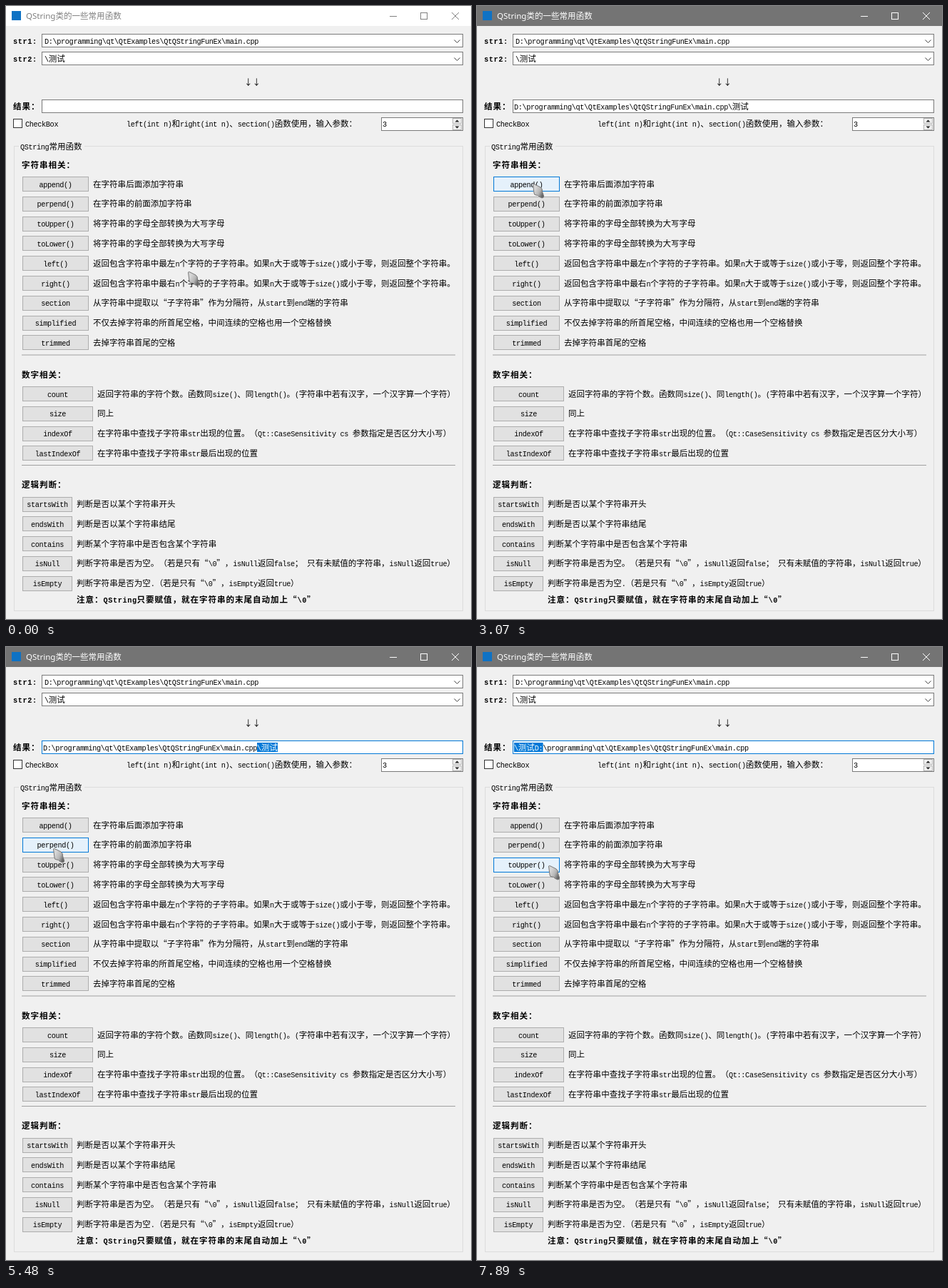
An HTML page with a canvas for the animation above (8 s loop, 652 by 859 pixels).

```html
<!DOCTYPE html>
<html lang="zh-CN">
<head>
<meta charset="utf-8">
<style>
html, body { margin: 0; height: 100%; overflow: hidden; background: #f0f0f0; }
canvas { display: block; }
</style>
</head>
<body>
<canvas id="stage" width="652" height="859"></canvas>
<script>
const ctx = document.getElementById('stage').getContext('2d');
const LOOP = 8000, CELL = 5.77;
const GREY = '#7a7a7a', DARK = '#171717', BLUE = '#0078d7';
const PATH = 'D:\\programming\\qt\\QtExamples\\QtQStringFunEx\\main.cpp';
const TAIL = '\\测试';

// Button groups: first row centre, button width, rows of [name, description]
const groups = [
  { title: '字符串相关：', titleY: 223, top: 249.5, width: 93, rows: [
    ['append()', '在字符串后面添加字符串'],
    ['perpend()', '在字符串的前面添加字符串'],
    ['toUpper()', '将字符串的字母全部转换为大写字母'],
    ['toLower()', '将字符串的字母全部转换为大写字母'],
    ['left()', '返回包含字符串中最左n个字符的子字符串。如果n大于或等于size()或小于零，则返回整个字符串。'],
    ['right()', '返回包含字符串中最右n个字符的子字符串。如果n大于或等于size()或小于零，则返回整个字符串。'],
    ['section', '从字符串中提取以“子字符串”作为分隔符，从start到end端的字符串'],
    ['simplified', '不仅去掉字符串的所首尾空格，中间连续的空格也用一个空格替换'],
    ['trimmed', '去掉字符串首尾的空格']] },
  { title: '数字相关：', titleY: 517, top: 543.5, width: 99, rows: [
    ['count', '返回字符串的字符个数。函数同size()、同length()。(字符串中若有汉字，一个汉字算一个字符）'],
    ['size', '同上'],
    ['indexOf', '在字符串中查找子字符串str出现的位置。（Qt::CaseSensitivity cs 参数指定是否区分大小写）'],
    ['lastIndexOf', '在字符串中查找子字符串str最后出现的位置']] },
  { title: '逻辑判断：', titleY: 671, top: 698, width: 70, rows: [
    ['startsWith', '判断是否以某个字符串开头'],
    ['endsWith', '判断是否以某个字符串结尾'],
    ['contains', '判断某个字符串中是否包含某个字符串'],
    ['isNull', '判断字符串是否为空。（若是只有“\\0”，isNull返回false； 只有未赋值的字符串，isNull返回true）'],
    ['isEmpty', '判断字符串是否为空.（若是只有“\\0”，isEmpty返回true）']] },
];

// Each step changes part of the state; sel is a [from, to] range of the result text in x
const steps = [
  [0, { at: [255, 372], beam: false, active: false, result: '', sel: null, edge: GREY, edge2: GREY, hot: {} }],
  [330, { at: [105, 165] }],
  [680, { at: [108, 105], edge: DARK }],
  [1020, { at: [112, 80], edge: GREY, edge2: DARK }],
  [1360, { at: [122, 75.5], beam: true }],
  [2390, { at: [75, 213], beam: false, edge2: GREY }],
  [2720, { at: [75, 238], hot: { 'append()': 1 } }],
  [3070, { at: [78, 249], active: true, result: PATH + TAIL }],
  [3420, { at: [78, 246] }],
  [3760, { at: [185, 162], hot: { 'append()': 0.15 } }],
  [4110, { at: [401, 143], beam: true, edge: DARK, hot: {} }],
  [4440, { at: [372, 145], sel: [369, 381] }],
  [4790, { at: [356, 138], sel: [352, 381] }],
  [5140, { at: [66, 289], beam: false, edge: '#0c4b7c' }],
  [5480, { at: [66, 282], edge: BLUE, hot: { 'perpend()': 1 } }],
  [5820, { result: TAIL + PATH, sel: null, edge: GREY }],
  [6150, { at: [58, 234], hot: { 'append()': 0.3, 'perpend()': 1 } }],
  [6500, { at: [97, 147], beam: true, edge: DARK, hot: {} }],
  [6850, { at: [64, 139], sel: [69.3, 92.6] }],
  [7190, { at: [53, 145], sel: [52, 92.6] }],
  [7540, { at: [100, 306], beam: false, edge: BLUE, hot: { 'toUpper()': 0.5 } }],
  [7890, { hot: { 'toUpper()': 1 } }],
];

const stateAt = t => Object.assign({}, ...steps.filter(s => s[0] <= t).map(s => s[1]));

const isWide = ch => ch > '\u00ff';

// Fixed-pitch text: wide characters take two cells; bold adds about a pixel to each
function text(str, x, y, { bold = false, color = '#000' } = {}) {
  const weight = bold ? 'bold ' : '';
  ctx.fillStyle = color;
  for (const ch of str) {
    const wide = isWide(ch);
    ctx.font = weight + (wide ? '11.54px "Noto Sans CJK SC", "Noto Sans CJK", sans-serif'
                              : '10.2px "Liberation Mono", monospace');
    ctx.fillText(ch, x, y + 4);
    x += CELL * (wide ? 2 : 1) + (bold ? 0.96 : 0);
  }
}

function box(x, y, w, h, fill, stroke) {
  ctx.fillStyle = fill;
  ctx.fillRect(x, y, w, h);
  ctx.strokeStyle = stroke;
  ctx.lineWidth = 1;
  ctx.strokeRect(x + 0.5, y + 0.5, w - 1, h - 1);
}

function line(color, width, ...points) {
  ctx.strokeStyle = color;
  ctx.lineWidth = width;
  ctx.beginPath();
  points.forEach(([x, y]) => ctx.lineTo(x, y));
  ctx.stroke();
}

function mix(a, b, k) {
  return `rgb(${a.map((v, i) => Math.round(v + (b[i] - v) * k))})`;
}

function titleBar(active) {
  const ink = active ? '#fff' : '#808080';
  ctx.fillStyle = active ? '#747474' : '#fff';
  ctx.fillRect(0, 0, 652, 28);
  ctx.fillStyle = '#0f72c4';
  ctx.fillRect(8, 7, 13, 13);
  ctx.fillStyle = ink;
  ctx.font = '11.54px "Noto Sans", "Noto Sans CJK SC", sans-serif';
  ctx.fillText('QString类的一些常用函数', 28, 18);
  line(ink, 1, [538, 14.5], [548, 14.5]);
  ctx.strokeRect(581.5, 9.5, 9, 9);
  line(ink, 1, [625, 9], [635, 19]);
  line(ink, 1, [635, 9], [625, 19]);
}

function combo(label, value, y, edge) {
  text(label, 10, y, { bold: true });
  box(50, y - 10, 591, 19, '#fff', edge);
  text(value, 54, y);
  line('#404040', 1, [628.5, y - 1.5], [632.5, y + 2.5], [636.5, y - 1.5]);
}

function resultField({ result, sel, edge }) {
  text('结果：', 10, 140.5, { bold: true });
  box(50, 131, 591, 19, '#fff', edge);
  text(result, 52, 140.5);
  if (!sel) return;
  ctx.save();
  ctx.beginPath();
  ctx.rect(sel[0], 134, sel[1] - sel[0], 13);
  ctx.clip();
  ctx.fillStyle = BLUE;
  ctx.fillRect(0, 134, 652, 13);
  text(result, 52, 140.5, { color: '#fff' });
  ctx.restore();
}

function options() {
  box(10, 158, 13, 13, '#fff', '#333');
  text('CheckBox', 27, 165);
  text('left(int n)和right(int n)、section()函数使用，输入参数：', 169, 165);
  box(526, 156, 115, 19, '#fff', GREY);
  text('3', 528, 165);
  for (const [y, dir] of [[157, 1], [166, -1]]) {
    box(626, y, 13, 8, '#f0f0f0', '#b4b4b4');
    const mid = y + 4;
    ctx.fillStyle = '#222';
    ctx.beginPath();
    ctx.moveTo(629.5, mid + 1.5 * dir);
    ctx.lineTo(635.5, mid + 1.5 * dir);
    ctx.lineTo(632.5, mid - 1.5 * dir);
    ctx.fill();
  }
}

function button(name, y, width, heat) {
  box(23, Math.round(y - 10.5), width, 21,
    mix([225, 225, 225], [229, 241, 251], heat),
    mix([173, 173, 173], [0, 120, 215], heat));
  text(name, 23 + (width - name.length * CELL) / 2, y);
}

function functionPanel(hot) {
  ctx.strokeStyle = '#dcdcdc';
  ctx.lineWidth = 1;
  ctx.strokeRect(11.5, 196.5, 629, 651);
  ctx.fillStyle = '#f0f0f0';
  ctx.fillRect(18, 190, 92, 12);
  text('QString常用函数', 20, 196.5);
  for (const { title, titleY, top, width, rows } of groups) {
    text(title, 22, titleY, { bold: true });
    rows.forEach(([name, note], i) => {
      const y = top + i * 27.8;
      button(name, y, width, hot[name] || 0);
      text(note, 29 + width, y);
    });
  }
  for (const y of [489, 643.5]) line('#a0a0a0', 1, [22, y], [630, y]);
  text('注意：QString只要赋值，就在字符串的末尾自动加上“\\0”', 99, 832, { bold: true });
}

const arrow = new Path2D('M0.5 1 Q1 0 3 1 L11 5 Q14 7 13.5 11 L15.5 17 Q16 20 13 20 L9 18 Q8 16 5 16 Q2 16 2 13 Z');

function cursor([x, y], beam) {
  ctx.save();
  ctx.translate(x, y);
  if (beam) {
    line('#777', 2, [0, -6], [0, 6]);
    for (const end of [-7.5, 7.5]) {
      ctx.beginPath();
      ctx.arc(0, end, 2.5, 0, 7);
      ctx.fillStyle = '#c4c4c4';
      ctx.fill();
      ctx.strokeStyle = '#777';
      ctx.lineWidth = 1.2;
      ctx.stroke();
    }
  } else {
    const shade = ctx.createLinearGradient(2, 10, 14, 16);
    shade.addColorStop(0, '#d6d6d6');
    shade.addColorStop(0.55, '#b5b5b5');
    shade.addColorStop(1, '#666');
    ctx.fillStyle = shade;
    ctx.fill(arrow);
    ctx.strokeStyle = '#777';
    ctx.lineWidth = 1;
    ctx.stroke(arrow);
  }
  ctx.restore();
}

function draw(t) {
  const state = stateAt(t);
  ctx.fillStyle = '#f0f0f0';
  ctx.fillRect(0, 0, 652, 859);
  titleBar(state.active);
  combo('str1:', PATH, 49, GREY);
  combo('str2:', TAIL, 74, state.edge2);
  text('↓↓', 334, 107);
  resultField(state);
  options();
  functionPanel(state.hot);
  cursor(state.at, state.beam);
}

const start = performance.now();
function tick() {
  draw((performance.now() - start) % LOOP);
  requestAnimationFrame(tick);
}
tick();
</script>
</body>
</html>
```
